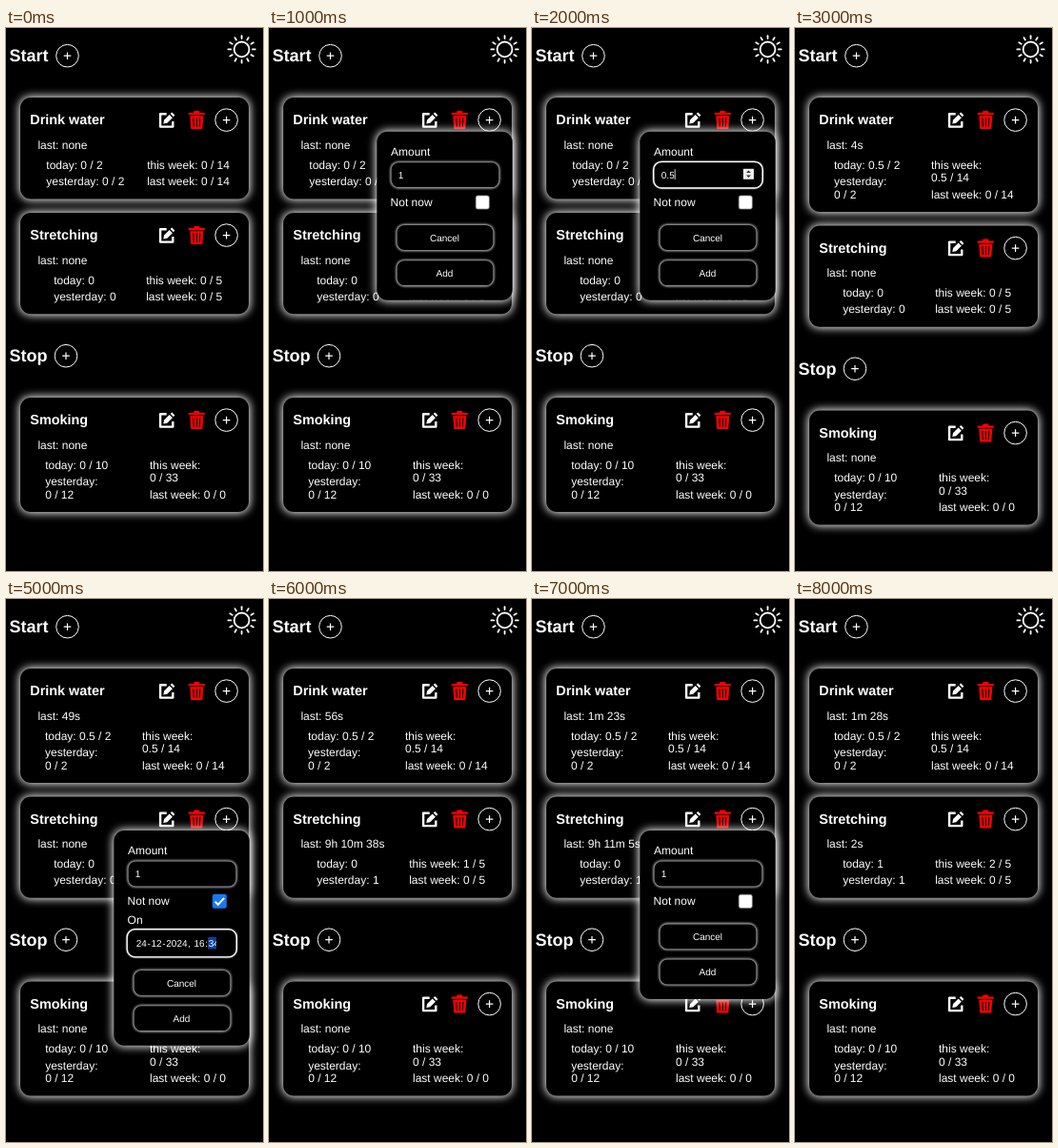
These frames come from a looping animation (270x570 px, 9000 ms). An HTML page:

```html
<!DOCTYPE html>
<html lang="en">
<head>
<meta charset="utf-8">
<title>Habit counter</title>
<style>
html, body { margin: 0; width: 100%; height: 100%; overflow: hidden; background: #000; }
svg { display: block; width: 270px; height: 570px; }
text { font-family: "Liberation Sans", Arial, sans-serif; fill: #fff; text-rendering: geometricPrecision; white-space: pre; }
.halo { fill: #fff; filter: blur(5px); }
.rim { fill: #b0b0b0; filter: blur(1.1px); }
.line { fill: none; stroke: #fff; }
</style>
</head>
<body>
<svg id="stage" viewBox="0 0 270 570"></svg>
<script>
const stage = document.getElementById("stage");
const STEP = 1000, GROW = 13.5;

const text = (x, y, str, size = 12, extra = "") =>
  `<text x="${x}" y="${Math.round(y)}" font-size="${size}" ${extra}>${str}</text>`;
const bold = (x, y, str, size) => text(x, y, str, size, 'font-weight="700"');
const rect = (x, y, w, h, r, attrs) =>
  `<rect x="${x}" y="${y}" width="${w}" height="${h}" rx="${r}" ${attrs}/>`;
const path = (d, attrs) => `<path d="${d}" ${attrs}/>`;
const at = (x, y, body) => `<g transform="translate(${x} ${y})">${body}</g>`;

const panel = (x, y, w, h) =>
  rect(x - 1, y - 1, w + 2, h + 2, 12, 'class="halo"') + rect(x, y, w, h, 11, 'fill="#000"');

function field(x, y, w, h, focused) {
  const edge = focused
    ? rect(x - .4, y - .4, w + .8, h + .8, 8.5, 'class="line" stroke-width="1.3"') : "";
  return rect(x - .7, y - .7, w + 1.4, h + 1.4, 8.7, 'class="rim"') +
    rect(x + .6, y + .6, w - 1.2, h - 1.2, 7.5, 'fill="#000"') + edge;
}

const plus = (x, y) => at(x, y,
  '<circle r="11.8" class="line" stroke-width="1"/>' +
  path("M-3.8 0H3.8M0-3.8V3.8", 'class="line" stroke-width="1.2"'));

const pencil = (x, y) => at(x, y,
  path("M0-6.8H-6.6V6.6H6.6V1", 'class="line" stroke-width="2.4" stroke-linejoin="round"') +
  path("M-3.4 3.6L-2.6-.4L3-6L6.2-2.8L.6 2.8Z", 'fill="#fff"') +
  path("M4-7L5.6-8.4L8.6-5.4L7.2-3.8Z", 'fill="#fff"'));

const trash = (x, y) => at(x, y,
  path("M-8.5-7.6H-3.4L-2.6-9.6H2.6L3.4-7.6H8.5V-5.4H-8.5Z", 'fill="#f00"') +
  path("M-7-4.4H7L6 9.4H-6Z", 'fill="#f00"') +
  path("M-3.4-2.2L-3 7.2M0-2.2V7.2M3.4-2.2L3 7.2", 'stroke="#000" stroke-width="1.2"'));

function sun(x, y) {
  let rays = "";
  for (let i = 0; i < 12; i++)
    rays += path("M0-11.4V-14.2", `class="line" stroke-width="1.8" stroke-linecap="round" transform="rotate(${i * 30})"`);
  return at(x, y, '<circle r="7.9" class="line" stroke-width="1.8"/>' + rays);
}

// rows: [x, offset from the card top, words]
function card(y, h, title, last, rows) {
  return panel(15, y, 240, h) + bold(25.3, y + 28, title, 14.4) +
    pencil(168.7, y + 24) + trash(200.3, y + 23.6) + plus(231.6, y + 23.6) +
    text(33.4, y + 53.8, "last: " + last) +
    rows.map(([x, dy, str]) => text(x, y + dy, str)).join("");
}

const shortRows = (a, b, today, yest, week, lastWeek) => [
  [a, 74.8, "today: " + today], [a, 91.8, "yesterday: " + yest],
  [b, 74.8, "this week: " + week], [b, 91.8, "last week: " + lastWeek]];

const wrapRows = (a, b, today, yest, week, lastWeek) => [
  [a, 74.8, "today: " + today], [a, 92, "yesterday:"], [a, 105.8, yest],
  [b, 74.8, "this week:"], [b, 88, week], [b, 105.8, "last week: " + lastWeek]];

const button = (y, label) => field(134, y, 102, 27, false) +
  text(184.5, y + 17, label, 10, 'text-anchor="middle"');

function checkbox(y, on) {
  return on
    ? rect(216.8, y, 15, 15, 2.2, 'fill="#1a78f0"') +
      path(`M219.6 ${y + 7.8}l3.2 3.2l6.4-7`, 'class="line" stroke-width="2"')
    : rect(217.2, y + .4, 14.2, 14.2, 2.2, 'fill="#fff" stroke="#777" stroke-width=".8"');
}

const spinner = y => rect(222, y - 5.5, 11, 11, 0, 'fill="#eee"') +
  path(`M225 ${y - 1.2}l2.5-2.6l2.5 2.6zM225 ${y + 1.2}l2.5 2.6l2.5-2.6z`, 'fill="#333"');

function dateField(y) {
  let x = 136, out = "";
  const put = (str, w, pad) => {
    out += text(x + pad, y + 18, str, 10);
    x += w + 2 * pad;
  };
  put("24", 11.1, .7); put("-", 3.3, 0);
  put("12", 11.1, .7); put("-", 3.3, 0);
  put("2024", 22.2, .7); put(",", 5.6, 0);
  put("16", 11.1, .7); put(":", 2.8, 0);
  out += rect(x, y + 8, 221 - x, 12.5, 0, 'fill="#0b3f9e"');
  put("34", 11.1, .7);
  return field(127.5, y, 114.5, 28.5, true) + `<g clip-path="url(#edit)">${out}</g>`;
}

function dialog(y, { amount = "1", focused = false, dated = false }) {
  const drop = dated ? 48.7 : 0;
  let out = panel(113.3, y, 142.5, 177 + drop) + text(128, y + 25, "Amount") +
    field(128, y + 32, 114, 27, focused) + text(135.8, y + 49, amount, 10);
  if (focused)
    out += path(`M150.2 ${y + 39.5}v11`, 'class="line" stroke-width=".8"') + spinner(y + 44.6);
  out += text(127.6, y + 78, "Not now") + checkbox(y + 66.8, dated);
  if (dated) out += text(127.6, y + 98, "On") + dateField(y + 104);
  return out + button(y + 97.8 + drop, "Cancel") + button(y + 135 + drop, "Add");
}

const scenes = [
  {},
  { dialog: { } },
  { dialog: { amount: "0.5", focused: true } },
  { drink: "4s" },
  { drink: "37s", dialog: {} },
  { drink: "49s", dialog: { dated: true } },
  { drink: "56s", stretch: "9h 10m 38s", counts: [0, 1, 1] },
  { drink: "1m 23s", stretch: "9h 11m 5s", counts: [0, 1, 1], dialog: {} },
  { drink: "1m 28s", stretch: "2s", counts: [1, 1, 2] }
];

function render({ drink, stretch = "none", counts: [today, yest, week] = [0, 0, 0], dialog: form }) {
  const dy = drink ? GROW : 0;
  const drinkRows = drink
    ? wrapRows(41, 143, "0.5 / 2", "0 / 2", "0.5 / 14", "0 / 14")
    : shortRows(42.3, 148.2, "0 / 2", "0 / 2", "0 / 14", "0 / 14");
  return '<defs><clipPath id="edit"><rect x="135" y="340" width="86" height="40"/></clipPath></defs>' +
    bold(3.5, 35, "Start", 18) + plus(64.5, 29.2) + sun(247.6, 22.4) +
    card(73, 106.5 + dy, "Drink water", drink || "none", drinkRows) +
    card(194 + dy, 106.3, "Stretching", stretch,
      shortRows(50.2, 147.2, today, yest, week + " / 5", "0 / 5")) +
    bold(3.5, 350 + dy, "Stop", 18) + plus(63, 344.2 + dy) +
    card(388 + dy, 120, "Smoking", "none",
      wrapRows(41.2, 151, "0 / 10", "0 / 12", "0 / 33", "0 / 0")) +
    (form ? dialog(drink ? 243 : 108.7, form) : "");
}

let shown = -1;
const start = performance.now();
function tick(now) {
  const i = Math.floor(Math.max(0, now - start) / STEP) % scenes.length;
  if (i !== shown) {
    shown = i;
    stage.innerHTML = render(scenes[i]);
  }
  requestAnimationFrame(tick);
}
tick(start);
</script>
</body>
</html>
```
